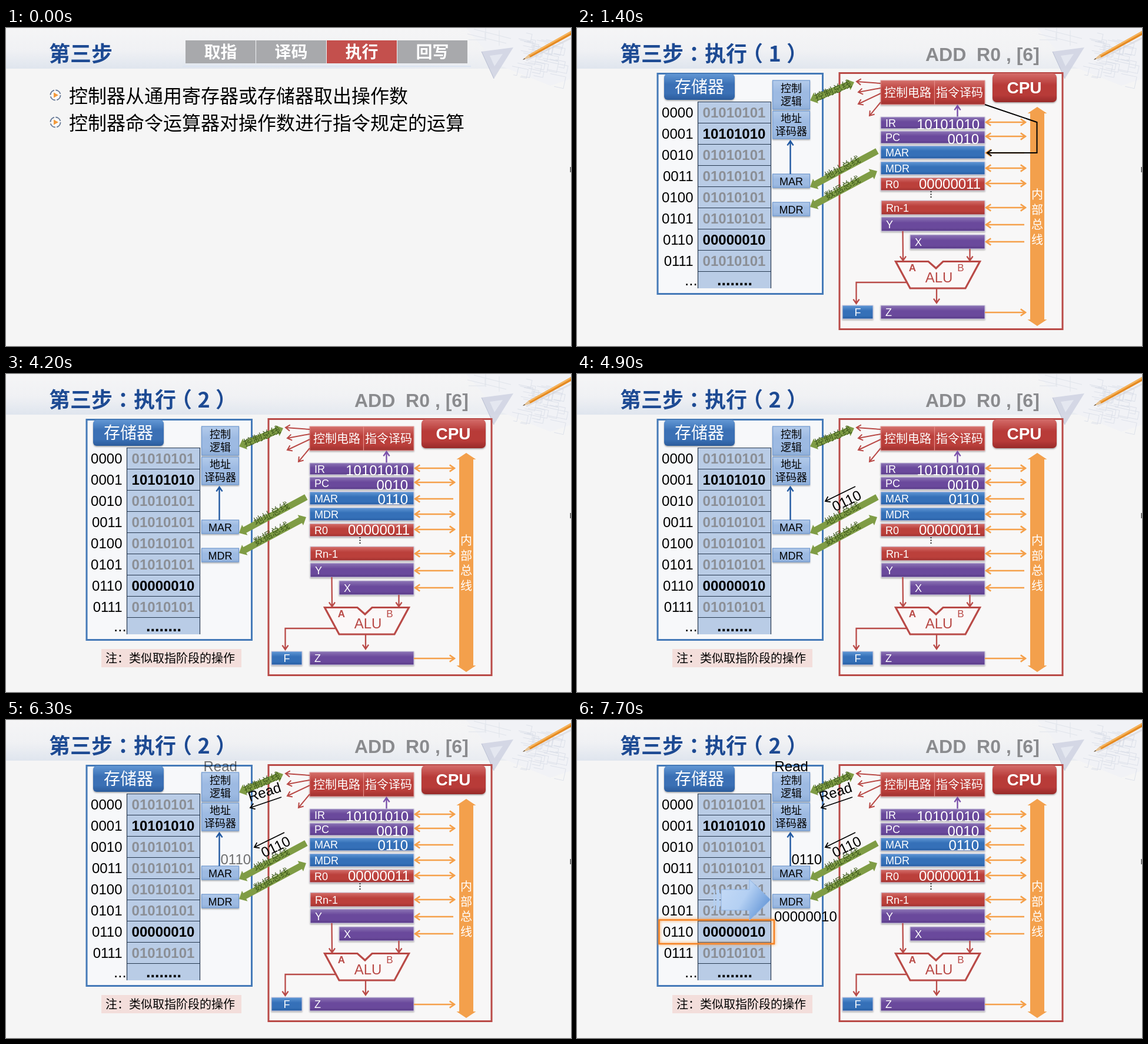
An HTML page for the animation above (8000 ms loop, 960 by 540 pixels).

```html
<!DOCTYPE html>
<html lang="zh-CN">
<head>
<meta charset="utf-8">
<title>第三步：执行</title>
<style>
html, body { margin: 0; width: 100%; height: 100%; overflow: hidden; background: #f5f5f5; }
svg { display: block; width: 960px; height: 540px; }
text { font-family: "Liberation Sans", Arial, "Noto Sans CJK SC", "Noto Sans CJK", sans-serif; white-space: pre; }
.cn { font-family: "Noto Sans CJK SC", "Noto Sans CJK", sans-serif; }
</style>
</head>
<body>
<svg id="stage" viewBox="0 0 960 540" xmlns="http://www.w3.org/2000/svg">
  <defs>
    <linearGradient id="head" x2="0" y2="1">
      <stop offset="0" stop-color="#f5f5f6"/><stop offset=".55" stop-color="#f0f1f4"/><stop offset="1" stop-color="#dfe5ee"/>
    </linearGradient>
    <linearGradient id="headFade">
      <stop offset=".3" stop-color="#f5f5f5" stop-opacity="0"/><stop offset="1" stop-color="#f5f5f5" stop-opacity=".6"/>
    </linearGradient>
    <linearGradient id="flow" x2="1" y2=".5">
      <stop offset="0" stop-color="#c6dbf6"/><stop offset=".55" stop-color="#b4d0f3"/><stop offset="1" stop-color="#6c9cda"/>
    </linearGradient>
    <filter id="shade" x="-20%" y="-30%" width="140%" height="170%">
      <feDropShadow dx="0" dy="1.5" stdDeviation="1.2" flood-opacity=".35"/>
    </filter>
    <filter id="glow" x="-10%" y="-30%" width="120%" height="160%">
      <feDropShadow dx="0" dy="0" stdDeviation="2.5" flood-color="#ff8a1c" flood-opacity=".9"/>
    </filter>
  </defs>
</svg>
<script>
const NS = 'http://www.w3.org/2000/svg';
const stage = document.getElementById('stage');
const defs = stage.querySelector('defs');

function el(name, attrs, parent) {
  const node = document.createElementNS(NS, name);
  for (const key in attrs) node.setAttribute(key, attrs[key]);
  parent.appendChild(node);
  return node;
}
const group = (parent = stage) => el('g', {}, parent);
const rect = (g, x1, y1, x2, y2, fill, more) =>
  el('rect', { x: x1, y: y1, width: x2 - x1, height: y2 - y1, fill, ...more }, g);
const path = (g, d, stroke, width = 2, more) =>
  el('path', { d, stroke, 'stroke-width': width, fill: 'none', ...more }, g);
function text(g, str, x, y, size, fill = '#000', more) {
  const node = el('text', { x, y, 'font-size': size, fill, ...more }, g);
  node.textContent = str;
  return node;
}
const cn = (g, str, x, y, size, fill, more) => text(g, str, x, y, size, fill, { class: 'cn', ...more });
const bold = { 'font-weight': 700 };
const mid = { 'text-anchor': 'middle' };
const end = { 'text-anchor': 'end' };

// Glossy vertical gradients for bars and badges
function gloss(id, top, main, low) {
  const g = el('linearGradient', { id, x2: 0, y2: 1 }, defs);
  [[0, top], [.4, main], [.75, main], [1, low]].forEach(([offset, c]) =>
    el('stop', { offset, 'stop-color': c }, g));
  return `url(#${id})`;
}
const purple = gloss('purple', '#8d76b6', '#6b4a9c', '#583a87');
const blue = gloss('blue', '#6198d6', '#3470b8', '#275da2');
const red = gloss('red', '#d4706b', '#bb3f3b', '#a0322f');
const badgeBlue = gloss('badgeBlue', '#6297d4', '#3a70b5', '#2b5c9c');
const badgeRed = gloss('badgeRed', '#d46c69', '#b83b39', '#982a29');
const pale = gloss('pale', '#b3cbeb', '#9dbae2', '#8fafd9');
const GREEN = '#7f9c45', RUST = '#b94a47', ORANGE = '#f5a04a', INK = '#1d4a93';

// Polyline with open heads: 'e' at the end, 'b' at both ends
function arrow(g, pts, color, width = 2, ends = 'e', size = 9) {
  let d = 'M' + pts.map(p => p.join()).join('L');
  const tip = ([x, y], [fx, fy]) => {
    const a = Math.atan2(fy - y, fx - x);
    const wing = s => [x + size * Math.cos(a + s), y + size * Math.sin(a + s)].join();
    d += `M${wing(.6)}L${x},${y}L${wing(-.6)}`;
  };
  const n = pts.length;
  tip(pts[n - 1], pts[n - 2]);
  if (ends === 'b') tip(pts[0], pts[1]);
  return path(g, d, color, width);
}

// Solid block arrow between two points
function blockArrow(g, [x1, y1], [x2, y2], half, wing, head, both, fill) {
  const len = Math.hypot(x2 - x1, y2 - y1), deg = Math.atan2(y2 - y1, x2 - x1) * 180 / Math.PI;
  const stop = both ? len - head : len;
  const tail = both ? `L${stop},${-wing}L${len},0L${stop},${wing}` : '';
  el('path', {
    d: `M0,0L${head},${-wing}V${-half}H${stop}${tail}V${half}H${head}V${wing}Z`,
    fill, transform: `translate(${x1} ${y1}) rotate(${deg})`
  }, g);
}

function tilted(g, str, x, y, deg, size, fill, more) {
  text(g, str, 0, size * .36, size, fill, { ...mid, ...more, transform: `translate(${x} ${y}) rotate(${deg})` });
}

function drawBackdrop() {
  const g = group();
  rect(g, 0, 0, 960, 540, '#f5f5f5');
  rect(g, 0, 0, 960, 69, 'url(#head)');
  rect(g, 0, 0, 960, 69, 'url(#headFade)');

  let seed = 7;
  const rnd = n => (seed = seed * 16807 % 2147483647) / 2147483647 * n;
  el('path', { d: 'M782,0L835,62L925,98L960,86V0Z', fill: '#f1f2f6' }, g);
  const plan = el('g', { transform: 'translate(872 8) rotate(12)' }, g);
  let d = '';
  for (let i = 0; i < 30; i++) {
    const w = 8 + rnd(22), h = 6 + rnd(16);
    d += `M${rnd(75).toFixed()},${(rnd(72) - 8).toFixed()}h${w.toFixed()}v${h.toFixed()}h${-(w * .6).toFixed()}`;
  }
  path(plan, d, '#dde1ea', 1);
  path(g, 'M784,10L850,26M795,2L858,18M815,0V22M838,4V30M786,20h28v-12', '#e0e4eb', 1);
  el('path', { d: 'M808,40L862,33L829,86Z', fill: '#cdd1e1', opacity: .8 }, g);
  el('path', { d: 'M822,47L844,44L830,65Z', fill: '#e4e7f0' }, g);
  path(g, 'M808,40L829,86', '#b9bfd2', 1);
  path(g, 'M884,55L960,17', '#cfcfd6', 3, { opacity: .5 });
  el('path', { d: 'M878,54L888,45.5L960,5V12L891,50Z', fill: '#e58a22' }, g);
  el('path', { d: 'M888,45.5L960,5V8L889.5,47.5Z', fill: '#f6b45c' }, g);
  el('path', { d: 'M878,54L888,45.5L891,50Z', fill: '#e6c497' }, g);
  el('path', { d: 'M878,54L881,51.2L882,52.8Z', fill: '#444' }, g);
  rect(g, 958.5, 236, 960, 245, '#555');
  cn(g, '第三步', 73, 57, 36, INK, bold);
}

function drawIntro(g) {
  rect(g, 300, 64, 790, 66, '#dbe4f2');
  ['取指', '译码', '执行', '回写'].forEach((name, i) => {
    const x = 305 + i * 120;
    rect(g, x, 21, x + 119, 60, i === 2 ? '#c4504d' : '#a8a9ac');
    cn(g, name, x + 59.5, 51, 28, '#fff', { ...bold, ...mid });
  });
  ['控制器从通用寄存器或存储器取出操作数', '控制器命令运算器对操作数进行指令规定的运算'].forEach((line, i) => {
    const y = 114 + i * 46;
    el('circle', { cx: 84, cy: y, r: 8.5, fill: '#fafafa', stroke: '#6d7f9b', 'stroke-width': 2, 'stroke-dasharray': '11 2.35' }, g);
    el('path', { d: `M81,${y - 4.5}l8,4.5l-8,4.5Z`, fill: '#f29a3c' }, g);
    cn(g, line, 107, y + 13, 32, '#000');
  });
}

function drawMemory(g) {
  rect(g, 137, 77.5, 417.5, 451.5, '#f7f8fa', { stroke: '#457ab8', 'stroke-width': 3 });
  rect(g, 148, 78, 268, 122, badgeBlue, { rx: 6, filter: 'url(#shade)' });
  cn(g, '存储器', 208, 110, 28, '#fff', mid);
  rect(g, 205, 125, 330, 442, '#b9cce6');
  let lines = 'M205.5,125V442M329.5,125V442';
  for (let i = 0; i < 9; i++) lines += `M205,${125.5 + i * 36}H330`;
  path(g, lines, '#26384f', 1.2);
  for (let i = 0; i < 8; i++) {
    const y = 152 + i * 36;
    const value = { 1: '10101010', 6: '00000010' }[i];
    text(g, i.toString(2).padStart(4, '0'), 197.5, y, 24, '#000', end);
    text(g, value || '01010101', 267, y, 24, value ? '#000' : '#8b8f96', { ...bold, ...mid });
  }
  text(g, '...', 183, 437, 26);
  text(g, '........', 268, 437, 27, '#000', { ...bold, ...mid });

  const box = (y1, y2) => rect(g, 332.5, y1, 395.5, y2, pale, { stroke: '#6f98cf', 'stroke-width': 1.2, filter: 'url(#shade)' });
  box(89, 138);
  cn(g, '控制', 364, 109, 18, '#000', mid);
  cn(g, '逻辑', 364, 131, 18, '#000', mid);
  box(141, 188);
  cn(g, '地址', 364, 160, 18, '#000', mid);
  cn(g, '译码器', 364, 182, 18, '#000', mid);
  box(248, 271);
  text(g, 'MAR', 364, 267, 18, '#000', mid);
  box(296, 319);
  text(g, 'MDR', 364, 314.5, 18, '#000', mid);
  arrow(g, [[362.5, 248], [362.5, 192]], '#1f57a0', 2.4);
}

function drawCpu(g) {
  rect(g, 446, 76.5, 825, 511.5, '#f8f7f7', { stroke: RUST, 'stroke-width': 3 });
  rect(g, 706, 77, 815, 126, badgeRed, { rx: 7, filter: 'url(#shade)' });
  text(g, 'CPU', 760, 111, 28, '#fff', { ...bold, ...mid });

  rect(g, 516, 89, 693, 130, red, { stroke: '#e3a19f', filter: 'url(#shade)' });
  path(g, 'M607.5,89V130', '#e58e89', 1.2);
  cn(g, '控制电路', 522, 117, 20, '#fff');
  cn(g, '指令译码', 610, 117, 20, '#fff');
  [[94, 475, 91], [102, 478, 109], [111, 478, 129], [126, 497, 149]].forEach(([y, x2, y2]) =>
    arrow(g, [[516, y], [x2, y2]], RUST));
  arrow(g, [[646.5, 151], [646.5, 132]], '#7b52ab', 2.4);

  // label, left, top, bottom, fill, link direction, link height
  [
    ['IR', 516, 151, 171, purple, 'b', 160], ['PC', 516, 175, 196, purple, 'b', 184],
    ['MAR', 516, 200, 222, blue, 'l', 212], ['MDR', 516, 227, 249, blue, 'b', 238],
    ['R0', 516, 254, 276, red, 'b', 264], ['Rn-1', 517, 293, 317, red, 'b', 305],
    ['Y', 517, 321, 345, purple, 'l', 334], ['X', 566, 351, 375, purple, 'l', 363],
    ['Z', 516, 471, 494, purple, 'r', 483], ['F', 451, 471, 494, blue]
  ].forEach(([name, x, y1, y2, fill, link, y]) => {
    rect(g, x, y1, name === 'F' ? 503 : 693, y2, fill, { stroke: '#cfcbe0', 'stroke-width': 1, filter: 'url(#shade)' });
    text(g, name, name === 'F' ? 471.5 : x + 8, (y1 + y2) / 2 + 6.5, 18, '#fff');
    if (link === 'b') arrow(g, [[695, y], [762, y]], ORANGE, 2.5, 'b', 10);
    if (link === 'l') arrow(g, [[760, y], [695, y]], ORANGE, 2.5, 'e', 10);
    if (link === 'r') arrow(g, [[693, y], [762, y]], ORANGE, 2.5, 'e', 10);
  });
  text(g, '10101010', 684, 171.5, 24, '#fff', end);
  text(g, '0010', 683, 196.5, 24, '#fff', end);
  text(g, '00000011', 686, 273, 24, '#fff', end);
  [278, 282.5, 287].forEach(y => rect(g, 600.5, y - 1, 602.5, y + 1, '#222'));

  blockArrow(g, [782, 134], [782, 506], 12, 16.5, 11, true, '#f3a04c');
  [...'内部总线'].forEach((c, i) => cn(g, c, 782, 290 + i * 25.5, 20, '#fff', mid));

  path(g, 'M541.5,396.5H597L610,408L622,396.5H684.5L660,442H566Z', RUST, 3.2, { fill: '#fbf8f8' });
  text(g, 'ALU', 615, 432, 24, RUST, mid);
  text(g, 'A', 570, 413, 17, RUST, { ...bold, ...mid });
  text(g, 'B', 652, 413, 17, RUST, mid);
  arrow(g, [[553.5, 345], [554, 395]], RUST, 2.3);
  arrow(g, [[667.5, 375], [667.5, 395]], RUST, 2.3);
  arrow(g, [[611, 443], [611, 467]], RUST, 2.3);
  arrow(g, [[560, 432], [474.5, 432], [474.5, 468]], RUST, 2.3);
}

function drawBuses(g) {
  [
    ['控制总线', [396, 123], [471, 92], true, 435, 106],
    ['地址总线', [396, 270], [510, 209], false, 451, 237],
    ['数据总线', [396, 304], [510, 243], true, 451, 271]
  ].forEach(([name, from, to, both, x, y]) => {
    blockArrow(g, from, to, 5.5, 10, 11, both, GREEN);
    const deg = Math.atan2(to[1] - from[1], to[0] - from[0]) * 180 / Math.PI;
    tilted(g, name, x, y, deg, 16.5, '#3f5a1d', { class: 'cn' });
  });
}

function drawFetch(g) {
  el('path', { d: 'M245,288H293V271L329,305L293,340V323H245Z', fill: 'url(#flow)', stroke: '#8fb4e4' }, g);
  rect(g, 237, 288, 242, 323, '#b4d0f3');
  rect(g, 232, 288, 234.5, 323, '#b4d0f3');
  text(g, '00000010', 335, 341.5, 24);
}

drawBackdrop();
const parts = {};
const add = (name, draw, parent) => draw(parts[name] = group(parent));

add('slide', g => {
  cn(g, '：', 190, 56, 36, INK, bold);
  cn(g, '执行', 217, 57, 36, INK, bold);
  cn(g, '（', 280, 57, 36, INK, bold);
  cn(g, '）', 356, 57, 36, INK, bold);
  text(g, 'ADD  R0 , [6]', 592, 56, 32, '#8a8b8e', bold);
  drawMemory(g);
  drawCpu(g);
  drawBuses(g);
  add('one', p => cn(p, '1', 336, 57, 36, INK, { ...bold, ...mid }), g);
  add('two', p => cn(p, '2', 336, 57, 36, INK, { ...bold, ...mid }), g);
});
add('route', g => arrow(g, [[693, 130], [781.5, 160], [781.5, 212], [697, 212]], '#000'));
add('mar', g => text(g, '0110', 683, 221, 24, '#fff', end));
add('note', g => {
  rect(g, 162, 467, 400, 498, '#f3dedb');
  cn(g, '注：类似取指阶段的操作', 169, 490, 20, '#000');
});
add('address', g => {
  tilted(g, '0110', 458, 215, -26, 24, '#000');
  arrow(g, [[473, 191], [422, 216]], '#000', 1.8);
});
add('command', g => {
  tilted(g, 'Read', 439, 122, -18, 24, '#000');
  arrow(g, [[468, 131], [415, 149]], '#000', 1.8);
});
add('arrived', g => {
  text(g, 'Read', 335.5, 87, 24);
  text(g, '0110', 364.5, 245, 24);
});
add('row', g => rect(g, 139.5, 339.5, 335, 380, 'none', { stroke: '#f58220', 'stroke-width': 2.5, filter: 'url(#glow)' }));
add('fetch', drawFetch);
add('intro', drawIntro);

// Opacity per part: [start in ms, value], held until the next entry
const LOOP = 8000;
const steps = {
  intro: [[0, 1], [700, .36], [1400, 0]],
  slide: [[0, 0], [700, .7], [1400, 1]],
  one: [[0, 1], [4200, 0]],
  two: [[0, 0], [4200, 1]],
  route: [[0, 0], [1400, 1], [4200, 0]],
  mar: [[0, 0], [3500, 1]],
  note: [[0, 0], [4200, 1]],
  address: [[0, 0], [4900, 1]],
  command: [[0, 0], [5600, 1]],
  arrived: [[0, 0], [6300, .55], [7000, 1]],
  row: [[0, 0], [7000, 1]],
  fetch: [[0, 0], [7700, 1]]
};
const begin = performance.now();
function render(now) {
  const t = Math.max(0, now - begin) % LOOP;
  for (const name in steps) {
    const value = steps[name].filter(([at]) => at <= t).pop()[1];
    parts[name].setAttribute('opacity', value);
  }
  requestAnimationFrame(render);
}
render(begin);
</script>
</body>
</html>
```
